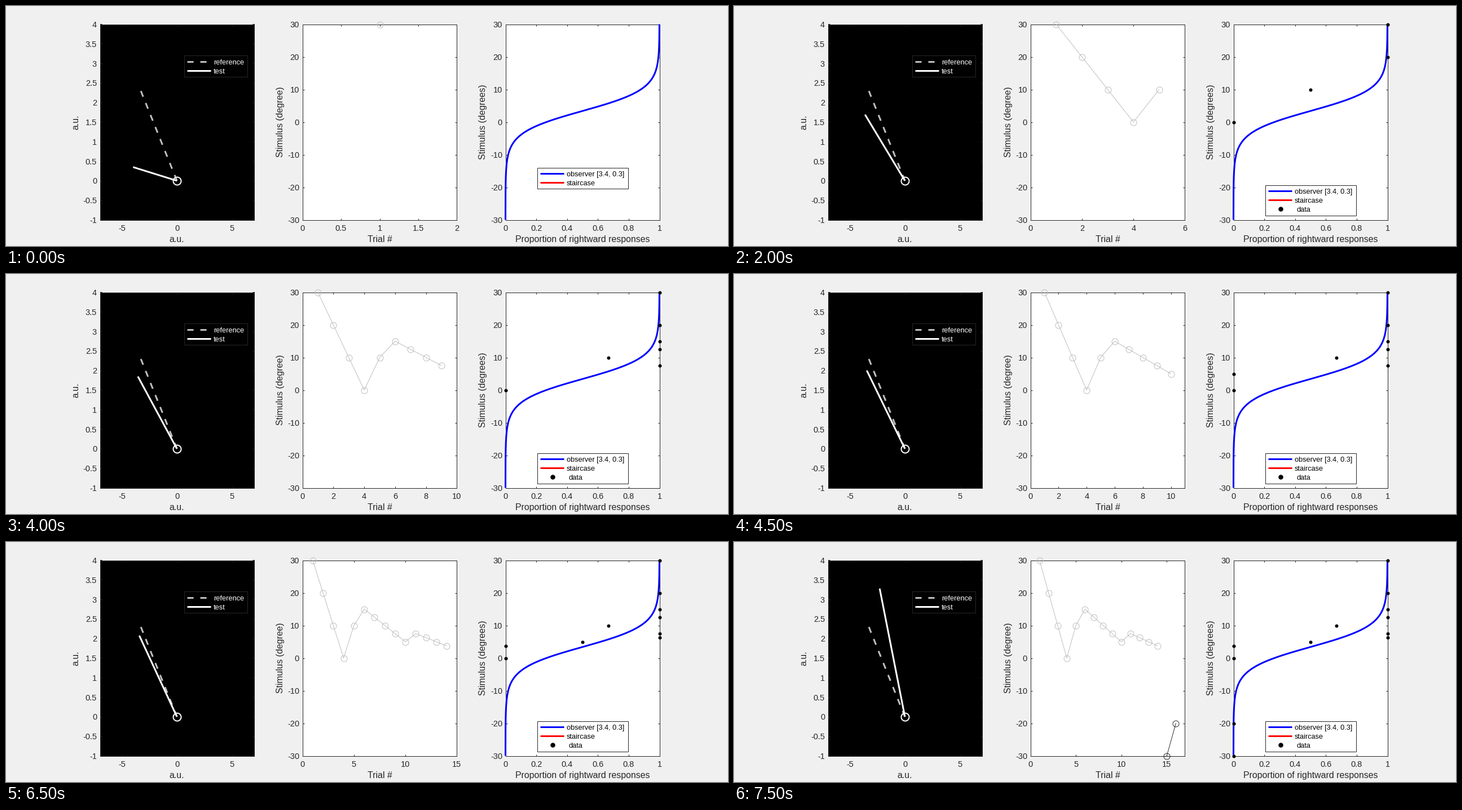
These frames come from a looping animation (1280 px wide and 427 px high, 8000 ms). A matplotlib script:

```python
import numpy as np
import matplotlib.pyplot as plt
from matplotlib.animation import FuncAnimation
from matplotlib.patches import Rectangle

W, H, DPI = 1280, 427, 128  # a power of two keeps the pixel size exact
PX = 72 / DPI  # points per pixel
INK, GRAY = "#262626", "#bfbfbf"
TICK, LABEL, SMALL = 14.5 * PX, 15.9 * PX, 12.75 * PX

plt.rcParams.update({"font.family": "Liberation Sans", "axes.edgecolor": INK,
                     "axes.linewidth": PX, "lines.dash_capstyle": "butt",
                     "lines.solid_capstyle": "butt"})

STIMULI = np.array([30, 20, 10, 0, 10, 15, 12.5, 10, 7.5, 5, 7.5, 6.25, 5, 3.75, -30, -20])
RIGHTWARD = np.array([1, 1, 1, 0, 0, 1, 1, 1, 1, 0, 1, 1, 1, 0, 0, 0])
FIRST_RUN = 14
REFERENCE_ANGLE, LENGTH = 145, 4
BIAS, SLOPE = 3.4, 0.3

fig = plt.figure(figsize=(W / DPI, H / DPI), dpi=DPI, facecolor="#f0f0f0")


def panel(left, right, xlim, ylim, xticks, yticks, face="white"):
    top, bottom = 32.5, 380.5
    ax = fig.add_axes([left / W, 1 - bottom / H, (right - left) / W, (bottom - top) / H],
                      facecolor=face)
    ax.set(xlim=xlim, ylim=ylim)
    set_ticks(ax.xaxis, xticks)
    set_ticks(ax.yaxis, yticks)
    ax.tick_params(direction="in", top=True, right=True, length=3 * PX, width=PX,
                   color=INK, labelcolor=INK, labelsize=TICK)
    ax.tick_params(axis="x", pad=8.5 * PX)
    ax.tick_params(axis="y", pad=5.5 * PX)
    return ax


def set_ticks(axis, values):
    axis.set_ticks(values, [f"{v:g}" for v in values])


def tick_step(limit):
    for largest, step in ((2, 0.5), (5, 1), (12, 2)):
        if limit <= largest:
            return step
    return 5


# Overlay in pixel coordinates for labels and legends
overlay = fig.add_axes([0, 0, 1, 1], zorder=5)
overlay.set(xlim=(0, W), ylim=(H, 0))
overlay.axis("off")


def write(x, y, text, size, color=INK, **kw):
    return overlay.text(x, y, text, fontsize=size, color=color, va="baseline",
                        rotation_mode="anchor", **kw)


def legend(left, top, right, bottom, rows, face, edge, color):
    artists = [overlay.add_patch(Rectangle((left, top), right - left, bottom - top,
                                           fc=face, ec=edge, lw=PX))]
    for i, (text, style) in enumerate(rows):
        y = top + 10.5 + 16.2 * i
        is_marker = "marker" in style
        xs = [left + 27] if is_marker else [left + 5.5, left + 47.5]
        artists += overlay.plot(xs, [y] * len(xs), **style)
        artists.append(write(left + (55.5 if is_marker else 52.5), y + 5, text, SMALL, color))
    return artists


def thick(color, **kw):
    return dict(color=color, lw=3 * PX, **kw)


dashed = thick(GRAY, dashes=(11 / 3, 12 / 3))

# Stimulus display
view = panel(166.5, 439.5, (-7, 7), (-1, 4), [-5, 0, 5], np.arange(-1, 4.1, 0.5), "black")


def arm(degrees):
    a = np.radians(degrees)
    return [LENGTH * np.cos(a), 0], [LENGTH * np.sin(a), 0]


view.plot(*arm(REFERENCE_ANGLE), **dashed)
test_line, = view.plot([], [], **thick("white"))
view.plot(0, 0, "o", ms=14 * PX, mfc="none", mec="white", mew=2 * PX)
legend(315.5, 88, 427.5, 125.5, [("reference", dashed), ("test", thick("white"))],
       "black", INK, "white")

# Staircase history
history = panel(525.5, 799.5, (0, 2), (-30, 30), [0, 1, 2], range(-30, 31, 10))
runs = [history.plot([], [], "o-", color=c, lw=w * PX, ms=11 * PX, mfc="none",
                     mew=w * PX, clip_on=False, zorder=4)[0]
        for c, w in ((GRAY, 1), ("black", 0.8))]

# Psychometric function
curve = panel(885.5, 1158.5, (0, 1), (-30, 30), np.arange(0, 1.1, 0.2), range(-30, 31, 10))
level = np.linspace(-30, 30, 400)
curve.plot(1 / (1 + np.exp(-SLOPE * (level - BIAS))), level, clip_on=False, zorder=4,
           **thick("blue"))
data, = curve.plot([], [], "o", color="black", ms=6 * PX, mew=0, clip_on=False, zorder=5)

rows = [(f"observer [{BIAS}, {SLOPE}]", thick("blue")), ("staircase", thick("red"))]
dot = dict(marker="o", ls="none", color="black", ms=8.5 * PX, mew=0)
short_legend = legend(941.5, 287.5, 1102.5, 324.5, rows, "white", INK, "black")
full_legend = legend(941.5, 318.5, 1102.5, 372.5, rows + [("data", dot)], "white", INK, "black")

for x, text in ((303, "a.u."), (662.5, "Trial #"), (1022, "Proportion of rightward responses")):
    write(x, 420, text, LABEL, ha="center")
for x, text in ((128, "a.u."), (490.5, "Stimulus (degree)"), (850, "Stimulus (degrees)")):
    write(x, 206.5, text, LABEL, ha="center", rotation=90)


def update(frame):
    n = frame + 1
    shown, answers = STIMULI[:n], RIGHTWARD[:n]
    trials = np.arange(1, n + 1)

    test_line.set_data(*arm(REFERENCE_ANGLE + shown[-1]))

    history.set_xlim(0, n + 1)
    set_ticks(history.xaxis, np.arange(0, n + 1.01, tick_step(n + 1)))
    for run, part in zip(runs, (slice(FIRST_RUN), slice(FIRST_RUN, None))):
        run.set_data(trials[part], shown[part])

    levels = np.unique(shown) if n > 1 else np.array([])
    data.set_data([answers[shown == s].mean() for s in levels], levels)
    for artist in short_legend:
        artist.set_visible(n == 1)
    for artist in full_legend:
        artist.set_visible(n > 1)


anim = FuncAnimation(fig, update, frames=len(STIMULI), init_func=lambda: update(0),
                     interval=500, repeat=True, repeat_delay=0, blit=False)
plt.show()
```
